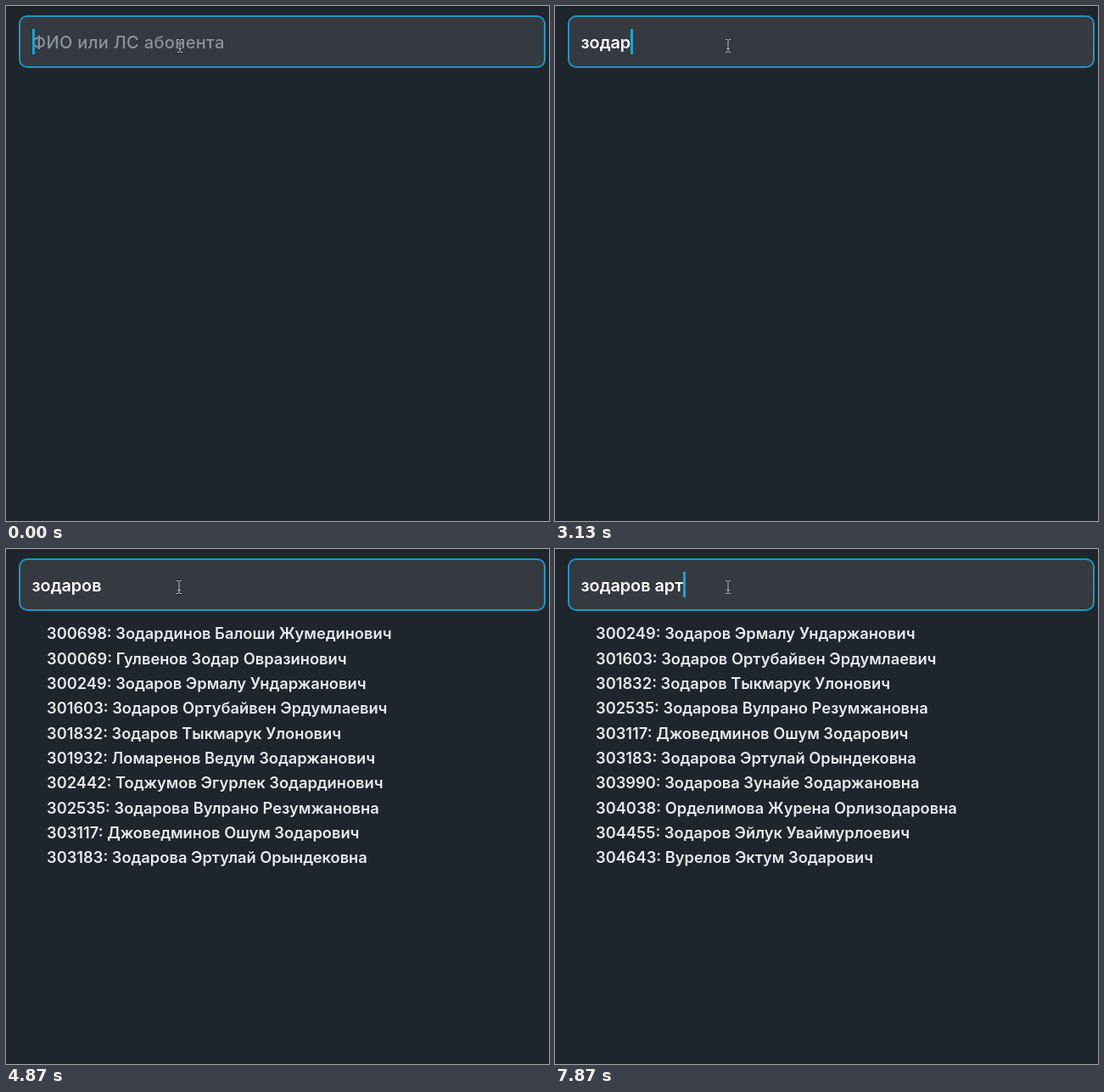
These frames come from a looping animation (640x607 px, 8 s). An HTML page:

```html
<!DOCTYPE html>
<html lang="ru">
<head>
<meta charset="utf-8">
<title>Поиск абонента</title>
<style>
  html, body { margin: 0; width: 100%; height: 100%; overflow: hidden; background: #1e252c; }
  #stage {
    position: relative; width: 640px; height: 607px; overflow: hidden;
    font: 600 18.3px Inter, "Noto Sans", sans-serif; color: #e6ebf0; white-space: pre;
  }
  #field {
    position: absolute; left: 15px; top: 11px; width: 621px; height: 62px; box-sizing: border-box;
    border: 2px solid #1c97c1; border-radius: 10px; background: #343a40;
  }
  #line {
    position: absolute; left: 30.5px; top: 28px; height: 30px;
    font-size: 19.8px; line-height: 30px; color: #fff;
  }
  #line.fallback { font-family: "Open Sans", "Noto Sans", sans-serif; font-weight: 700; }
  #caret {
    display: inline-block; width: 3px; height: 30px; margin-right: -3px;
    position: relative; top: -1px; vertical-align: top; background: #18a4d8;
  }
  #hint { font-size: 20px; font-weight: 500; letter-spacing: .35px; color: #8b939a; }
  #list { position: absolute; left: 48px; top: 85.4px; line-height: 29.33px; }
  #mouse { position: absolute; left: -8px; top: -10px; }
</style>
</head>
<body>
<div id="stage">
  <div id="field"></div>
  <div id="line"><span id="typed"></span><span id="caret"></span><span id="hint">ФИО или ЛС абонента</span></div>
  <div id="list"></div>
  <svg id="mouse" width="16" height="20" viewBox="-8 -10 16 20" fill="none">
    <defs><path id="beam" d="M-3-7.5H-1L0-6.5L1-7.5H3M0-6.5V6.5M-3 7.5H-1L0 6.5L1 7.5H3M-1.5 3.5H1.5"/></defs>
    <use href="#beam" stroke="#22272b" stroke-width="2.4"/>
    <use href="#beam" stroke="#c9cccf"/>
  </svg>
</div>
<script>
const LOOP = 8000, BLINK = 535;
const QUERY = 'зодаров арт';
const KEYS = [930, 1130, 1270, 1530, 1730, 4070, 4270, 5330, 5870, 6330, 6730];
const FONT_READY = 2000;
const SEARCHES = [[3200, 'зодар'], [5130, 'зодаров']];
const MOUSE = [[0, 205, 47], [2800, 204, 47], [3200, 204, 45]];
const PEOPLE = [
  '300698: Зодардинов Балоши Жумединович',
  '300069: Гулвенов Зодар Овразинович',
  '300249: Зодаров Эрмалу Ундаржанович',
  '301603: Зодаров Ортубайвен Эрдумлаевич',
  '301832: Зодаров Тыкмарук Улонович',
  '301932: Ломаренов Ведум Зодаржанович',
  '302442: Тоджумов Эгурлек Зодардинович',
  '302535: Зодарова Вулрано Резумжановна',
  '303117: Джоведминов Ошум Зодарович',
  '303183: Зодарова Эртулай Орындековна',
  '303990: Зодарова Зунайе Зодаржановна',
  '304038: Орделимова Журена Орлизодаровна',
  '304455: Зодаров Эйлук Уваймурлоевич',
  '304643: Вурелов Эктум Зодарович'
];

const $ = id => document.getElementById(id);
const line = $('line'), typed = $('typed'), caret = $('caret');
const hint = $('hint'), list = $('list'), mouse = $('mouse');

const find = query => PEOPLE.filter(p => p.toLowerCase().includes(query)).slice(0, 10).join('\n');
const results = SEARCHES.map(([at, query]) => [at, find(query)]);
const latest = (steps, t) => steps.filter(s => s[0] <= t).pop();

function setText(el, text) {
  if (el.textContent !== text) el.textContent = text;
}

function draw(t) {
  const count = KEYS.filter(k => k <= t).length;
  const lastKey = count ? KEYS[count - 1] : -200;
  setText(typed, QUERY.slice(0, count));
  hint.hidden = count > 0;
  line.classList.toggle('fallback', count > 0 && t < FONT_READY);
  caret.style.opacity = Math.floor((t - lastKey) / BLINK) % 2 ? 0 : 1;

  const found = latest(results, t);
  setText(list, found ? found[1] : '');

  const [, x, y] = latest(MOUSE, t);
  mouse.style.transform = `translate(${x}px, ${y}px)`;
}

const start = performance.now();
function tick(now) {
  draw(Math.max(0, now - start) % LOOP);
  requestAnimationFrame(tick);
}
draw(0);
requestAnimationFrame(tick);
</script>
</body>
</html>
```
